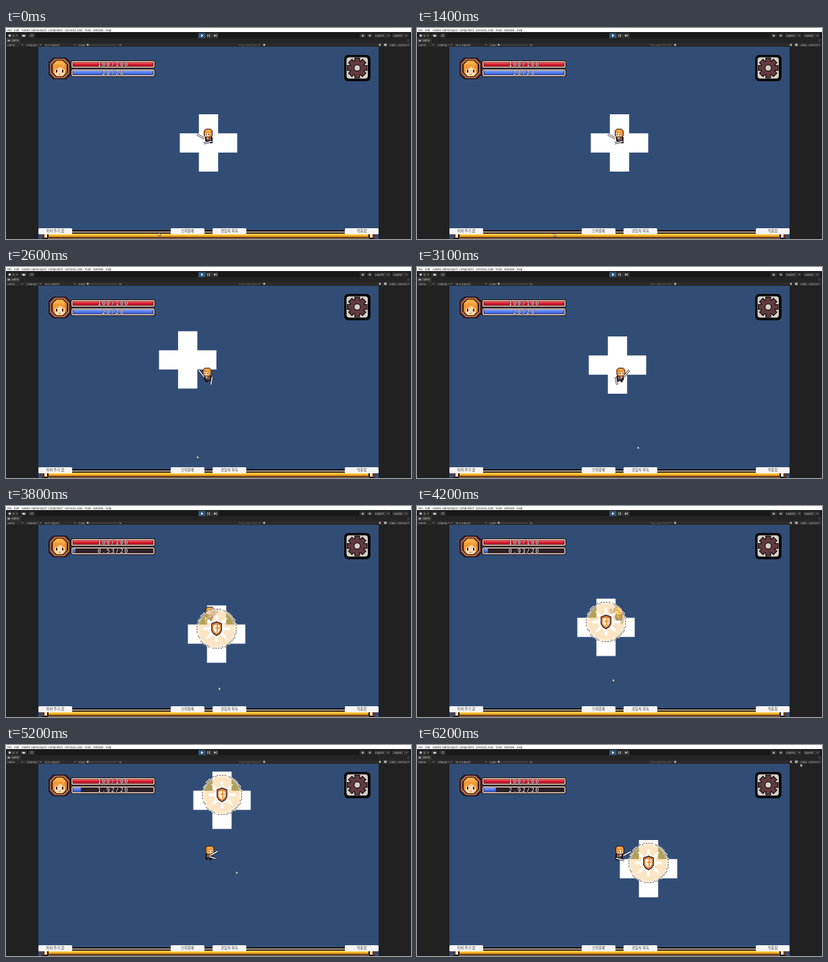
These frames come from a looping animation (600x313 px, 6.3 s). An HTML page with a canvas:

```html
<!DOCTYPE html>
<html lang="en">
<head>
<meta charset="utf-8">
<style>
  html, body { margin: 0; height: 100%; overflow: hidden; background: #212121; }
  canvas { display: block; width: 600px; height: 313px; }
</style>
</head>
<body>
<canvas id="stage" width="600" height="313"></canvas>
<script>
const ctx = document.getElementById('stage').getContext('2d');
const LOOP = 6300, STEP = 100, CAST = 3271;

// Rows of [time, x, y], joined by straight moves
const crossPath = [
  [1600, 300, 170.5], [1900, 267, 178], [2200, 267, 212], [2750, 270, 110],
  [2900, 284, 114], [3100, 297, 145.5], [3270, 299, 170], [3500, 339, 182],
  [3600, 341, 196], [3800, 312, 190], [4200, 280, 180], [4600, 271, 142],
  [4900, 300, 101], [5200, 320, 82], [5700, 343, 120], [6100, 343, 183.5]
];
const cursorPath = [
  [0, 226, 303.5], [1400, 203, 304.5], [2200, 200.5, 302.5], [2800, 324, 268],
  [3100, 326.5, 265.5], [3800, 315, 268.5], [4600, 264.5, 243.5],
  [5000, 290, 225], [5600, 442, 110], [6000, 560, 35], [6200, 568, 27.5]
];

function along(path, t) {
  if (t <= path[0][0]) return path[0].slice(1);
  for (let i = 1; i < path.length; i++) {
    const [t0, x0, y0] = path[i - 1], [t1, x1, y1] = path[i];
    if (t <= t1) {
      const k = (t - t0) / (t1 - t0);
      return [x0 + (x1 - x0) * k, y0 + (y1 - y0) * k];
    }
  }
  return path[path.length - 1].slice(1);
}

function rect(color, x, y, w, h) {
  ctx.fillStyle = color;
  ctx.fillRect(x, y, w, h);
}

function round(color, x, y, w, h, r) {
  ctx.fillStyle = color;
  ctx.beginPath();
  ctx.roundRect(x, y, w, h, r);
  ctx.fill();
}

function poly(color, ...points) {
  ctx.fillStyle = color;
  ctx.beginPath();
  for (let i = 0; i < points.length; i += 2) ctx.lineTo(points[i], points[i + 1]);
  ctx.fill();
}

function disc(color, x, y, r) {
  ctx.fillStyle = color;
  ctx.beginPath();
  ctx.arc(x, y, r, 0, 7);
  ctx.fill();
}

// Rectangle with corners cut by c
function octagon(color, x, y, w, h, c) {
  poly(color, x + c, y, x + w - c, y, x + w, y + c, x + w, y + h - c,
    x + w - c, y + h, x + c, y + h, x, y + h - c, x, y + c);
}

function text(str, x, y, color, size = 4, align = 'left') {
  ctx.font = `${size}px Inter, "Noto Sans CJK KR", "Noto Sans CJK", sans-serif`;
  ctx.textAlign = align;
  ctx.fillStyle = color;
  ctx.fillText(str, x, y);
}

const arrow = (x, y, color = '#aaa') => poly(color, x, y, x + 2.4, y, x + 1.2, y + 1.5);

function drawEditor() {
  rect('#212121', 0, 0, 600, 313);
  rect('#fff', 0, 0, 600, 6);
  const menu = { File: 2, Edit: 12, Assets: 23, GameObject: 37, Component: 62, Services: 87,
    Jobs: 104, Tools: 116, Window: 129, Help: 147.5 };
  for (const name in menu) text(name, menu[name], 4.5, '#222');

  rect('#191919', 0, 6, 600, 9);
  rect('#242424', 0, 15, 600, 7);
  rect('#333', 0, 15, 22, 7);
  rect('#2b2b2b', 0, 22, 600, 6);
  for (const [x, w] of [[2, 17], [21, 10], [33, 10], [524, 9], [535, 8], [545, 25], [572, 25]])
    round('#303030', x, 8, w, 6.5, 1);
  disc('#ccc', 5.5, 11.3, 1.7);
  text('6', 10, 12.8, '#aaa');
  arrow(15, 10.7);
  disc('#ccc', 25.3, 11.5, 1.4);
  disc('#ccc', 27, 11.5, 1.6);
  rect('#888', 36.5, 9.5, 3.5, 3.5);
  rect('#303030', 37.3, 10.3, 2, 2);
  round('#303030', 285, 7.5, 30, 7.5, 1);
  rect('#31587f', 285, 7.5, 10, 7.5);
  poly('#fff', 289, 9.2, 292.3, 11.2, 289, 13.2);
  rect('#ccc', 298.5, 9.3, 1, 4);
  rect('#ccc', 301, 9.3, 1, 4);
  poly('#ccc', 308.3, 9.2, 311.3, 11.2, 308.3, 13.2);
  rect('#ccc', 311.5, 9.2, .8, 4);
  rect('#999', 527, 10, 3, 3);
  disc('#999', 539, 11.3, 1.6);
  text('Layers', 547, 12.8, '#bbb');
  arrow(565, 10.7);
  text('Layout', 574, 12.8, '#bbb');
  arrow(592, 10.7);

  rect('#aaa', 2.5, 17.5, 3.5, 2.5);
  text('Game', 8, 20.3, '#ccc');
  for (let i = 0; i < 3; i++) rect('#aaa', 595.5, 16.8 + i * 1.5, .8, .8);

  const row = { 'Game': 2, 'Display 1': 31, '16:9 Aspect': 57, 'Scale': 107, '1x': 167, 'Stats': 568, 'Gizmos': 580 };
  for (const name in row) text(name, row[name], 26.5, '#aaa', 4.1);
  for (const x of [23, 50, 101, 595]) arrow(x, 24.4);
  rect('#666', 120, 24.8, 45, .7);
  disc('#bbb', 121, 25, 1.4);
  text('Play Maximized', 345, 26.5, '#626262', 4.1);
  arrow(375, 24.4, '#666');
  disc('#aaa', 382.5, 25, 1.7);
  poly('#bbb', 552.5, 24.2, 555, 23, 555, 27, 552.5, 25.8);
  rect('#aaa', 560, 23.2, 4, 3.5);
}

function drawPortrait() {
  octagon('#170d10', 63, 44, 33, 32, 7);
  octagon('#6d3030', 64, 45, 31, 30, 7);
  octagon('#d79a66', 66, 46, 27, 28, 7);
  octagon('#241217', 67, 47, 25, 26, 7);
  octagon('#e88b2c', 69, 48, 21, 24, 6);
  octagon('#f8b04a', 71, 49, 16, 11, 4);
  octagon('#fbd9b0', 72, 58, 15, 13, 3);
  poly('#f09b37', 70, 62, 72, 54, 83, 54, 89, 62, 84, 61, 81, 57, 76, 61);
  rect('#3a1c20', 74, 62, 2, 4);
  rect('#3a1c20', 83, 62, 2, 4);
  rect('#c9705a', 78, 68, 3, 1);
}

function drawBar(y, ratio, light, mid, dark, label) {
  octagon('#160d12', 96, y, 125, 12, 2);
  octagon('#f0d2b6', 97, y + 1, 123, 10, 1.5);
  rect('#2c2026', 98.5, y + 2.5, 120, 7);
  const w = 118 * ratio;
  rect(mid, 99.5, y + 3, w, 6);
  rect(light, 99.5, y + 3, w, 1.7);
  rect(dark, 99.5, y + 7.3, w, 1.7);
  ctx.font = '8px "DejaVu Sans Mono", monospace';
  ctx.letterSpacing = '1.8px';
  ctx.textAlign = 'center';
  ctx.lineWidth = 1.2;
  ctx.strokeStyle = 'rgba(40,20,35,.6)';
  ctx.strokeText(label, 159, y + 9);
  ctx.fillStyle = '#fff';
  ctx.fillText(label, 159, y + 9);
  ctx.letterSpacing = '0px';
}

function drawGear() {
  round('#080709', 501, 40, 39, 39, 6);
  round('#d5d1c9', 504.5, 43.5, 31.5, 31.5, 4);
  ctx.save();
  ctx.translate(520.3, 59.3);
  for (const [color, grow] of [['#130c0f', 1.2], ['#623b3e', 0]]) {
    disc(color, 0, 0, 10.5 + grow);
    for (let i = 0; i < 8; i++) {
      rect(color, -3 - grow, -14 - grow, 6 + 2 * grow, 6);
      ctx.rotate(Math.PI / 4);
    }
  }
  disc('#130c0f', 0, 0, 5.2);
  disc('#d5d1c9', 0, 0, 4);
  ctx.restore();
}

function drawBottom() {
  rect('#160d10', 53, 300, 494, 13);
  rect('#f1dcc4', 57, 302, 486, 1.3);
  rect('#f1dcc4', 57, 306, 4, 5);
  rect('#f1dcc4', 539, 306, 4, 5);
  rect('#6a3427', 53, 306, 4, 6);
  rect('#6a3427', 543, 306, 4, 6);
  rect('#e89a1c', 63, 305, 474, 5.2);
  rect('#ffd04a', 63, 305.5, 474, 2.2);
  rect('#d9a06c', 62, 311.5, 476, 1);
  for (const [x, label] of [[48, '파바 주기 꿈'], [244, '브위칼체'], [306, '경험치 획득'], [502, '적풍참']]) {
    round('#f5f5f5', x, 297, 50, 9, 1.5);
    text(label, x + 25, 302.5, '#444', 5.2, 'center');
  }
}

function drawCross(x, y) {
  rect('#fff', x - 14.25, y - 42.5, 28.5, 85);
  rect('#fff', x - 42.5, y - 14.25, 85, 28.5);
}

function drawShield(cx, cy) {
  const cell = 2, R = 30;
  cx = Math.round(cx);
  cy = Math.round(cy);
  for (let y = -R; y < R; y += cell) {
    for (let x = -R; x < R; x += cell) {
      const px = x + 1, py = y + 1, d = Math.hypot(px, py);
      if (d > R) continue;
      const turn = Math.atan2(py, px) / (Math.PI / 4);
      const off = Math.abs(turn - Math.round(turn)) * 2;
      let color = 'rgba(250,214,160,.62)';
      if (d > 28) color = (x + y) % 4 ? 'rgba(150,150,150,.85)' : 'rgba(235,222,200,.85)';
      else if (d > 26) color = 'rgba(255,236,205,.7)';
      else if (d < 12 + 10 * Math.max(0, 1 - off * 2.2)) color = 'rgba(255,255,250,.9)';
      else if (py < -6 && Math.abs(px) > 13) color = 'rgba(245,205,75,.65)';
      rect(color, cx + x, cy + y, cell, cell);
    }
  }
  const crest = (color, s) => poly(color, cx - 8 * s, cy - 8 * s, cx, cy - 11 * s, cx + 8 * s, cy - 8 * s,
    cx + 8 * s, cy + 3 * s, cx + 5 * s, cy + 8 * s, cx, cy + 11 * s, cx - 5 * s, cy + 8 * s, cx - 8 * s, cy + 3 * s);
  crest('#432536', 1);
  crest('#d98438', .84);
  crest('#fff0d8', .6);
  rect('#e39a45', cx, cy - 6, 2, 11);
  rect('#e39a45', cx - 2, cy - 2, 6, 2);
}

function drawSword(x0, y0, x1, y1) {
  for (const [color, width] of [['#17131c', 3], ['#f4f4f4', 1.5]]) {
    ctx.strokeStyle = color;
    ctx.lineWidth = width;
    ctx.beginPath();
    ctx.moveTo(x0, y0);
    ctx.lineTo(x1, y1);
    ctx.stroke();
  }
}

function drawHero(t, right, moving) {
  const stride = Math.floor(t / 300) % 2;
  ctx.save();
  ctx.translate(300, 0);
  if (right) ctx.scale(-1, 1);
  if (moving) ctx.translate(-1.5, 0);
  rect('#17131c', -3, 167, 3, 4);
  rect('#17131c', 2, 167, 4, moving ? 3 : 4);
  octagon('#17131c', -5, 160, 11, 9, 2);
  rect('#9a5a3c', -3, 161, 7, 5);
  rect('#f3e7da', -3, 161, 3, 3);
  rect('#39466a', -2, 166, 6, 2);
  octagon('#2a1518', -7, 149.5, 13, 13, 3);
  octagon('#ee9130', -6, 150.5, 11, 11, 2);
  rect('#ffbd59', -3, 151.5, 5, 2);
  rect('#fbdab4', -5, 156, 7, 4.5);
  rect('#2a1518', -4, 157, 1, 2);
  rect('#2a1518', 0, 157, 1, 2);
  if (!moving) {
    drawSword(-17, 158, -6, 164);
    drawSword(-7, 171, 5, 168);
  } else if (stride) {
    drawSword(-12, 157.5, -3, 163);
    drawSword(-9, 168.5, 0, 165.5);
  } else {
    drawSword(-13, 153, -5, 163);
    drawSword(7, 163, 5, 174.5);
  }
  ctx.restore();
}

function drawCursor(x, y) {
  ctx.lineWidth = .6;
  ctx.strokeStyle = '#222';
  poly('#fff', x, y, x, y + 5, x + 1.2, y + 4, x + 2, y + 5.6, x + 2.8, y + 5.2, x + 2.1, y + 3.7, x + 3.6, y + 3.6);
  ctx.closePath();
  ctx.stroke();
}

function draw(t) {
  const [x, y] = along(crossPath, t);
  const [mx, my] = along(cursorPath, t);
  const cast = t > CAST;
  const mana = cast ? .527 + (t - 3800) * .000996 : 20;
  const hero = () => drawHero(t, mx > 300, t > 1600 && t < 6100);

  drawEditor();
  ctx.save();
  ctx.beginPath();
  ctx.rect(48, 28, 504, 285);
  ctx.clip();
  rect('#314d75', 48, 28, 504, 285);
  drawCross(x, y);
  const shieldInFront = y - 8.5 > 160;
  if (!shieldInFront && cast) drawShield(x, y - 8.5);
  hero();
  if (shieldInFront && cast) drawShield(x, y - 8.5);
  drawPortrait();
  drawBar(48, 1, '#f0525a', '#d81f31', '#a81226', '100/100');
  drawBar(60.5, mana / 20, '#86a8ff', '#5078ec', '#3656bd', `${cast ? mana.toFixed(2) : 20}/20`);
  drawGear();
  drawBottom();
  ctx.restore();
  drawCursor(mx, my);
}

function tick() {
  const t = performance.now() % LOOP;
  draw(Math.floor(t / STEP) * STEP);
  requestAnimationFrame(tick);
}
tick();
</script>
</body>
</html>
```
